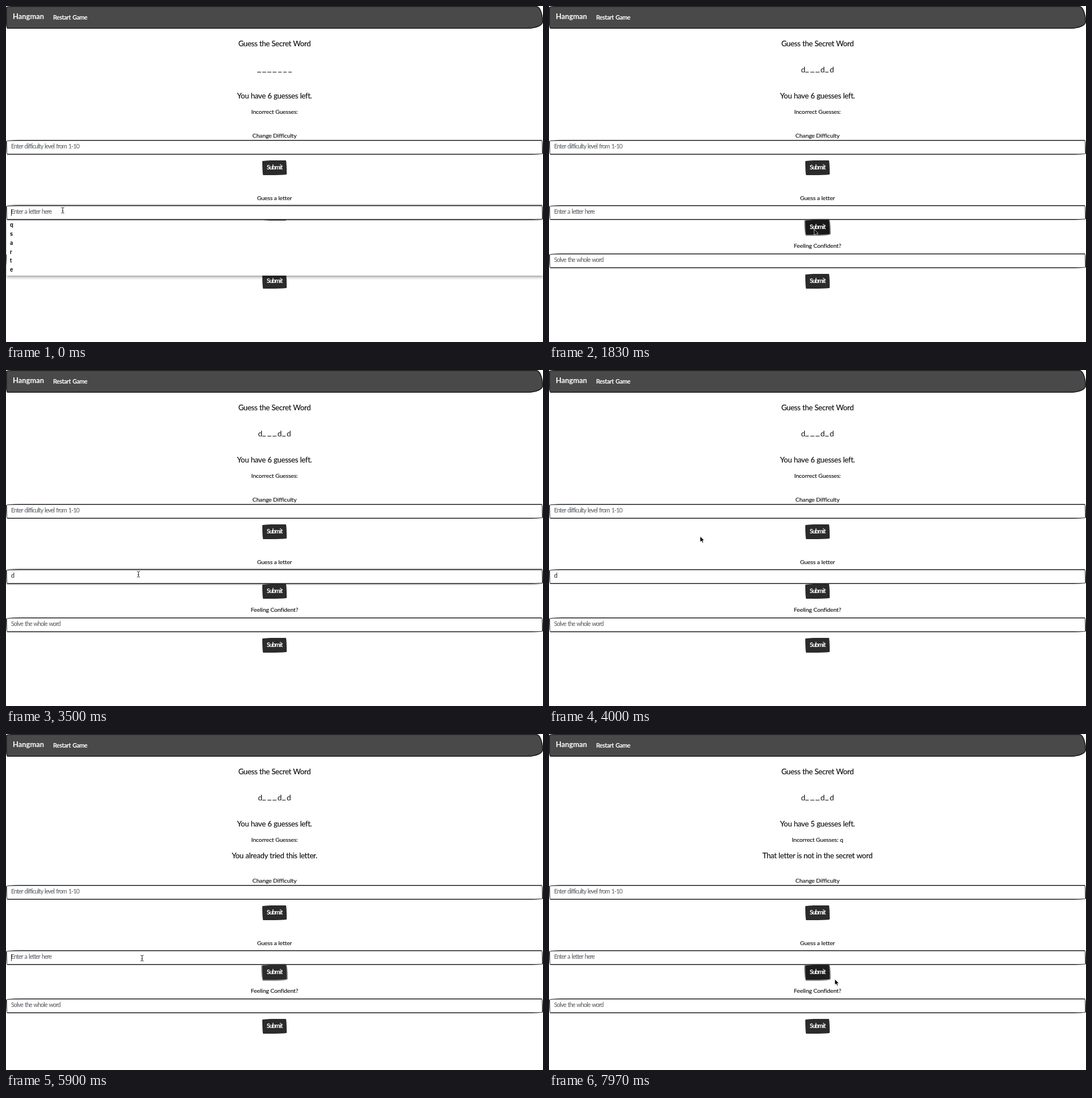
An HTML page that plays this animation: 947x592 px, repeating every 8 s.

```html
<!DOCTYPE html>
<html lang="en">
<head>
<meta charset="utf-8">
<title>Hangman</title>
<style>
  html, body { margin: 0; width: 100%; height: 100%; overflow: hidden; background: #fff; }
  #stage { position: absolute; left: 0; top: 0; width: 947px; height: 592px; overflow: hidden; font-family: Lato, sans-serif; color: #111; }
  #stage div, #stage p, #stage i, #stage svg { position: absolute; margin: 0; box-sizing: border-box; }

  /* Zero line height plus the shift makes "top" the text baseline. */
  p { line-height: 0; white-space: pre; transform: translateY(-.387em); }
  .big, .small { left: 0; width: 947px; text-align: center; -webkit-text-stroke: .15px; }
  .big { font-size: 13.2px; letter-spacing: -.3px; word-spacing: .3px; }
  .small { font-size: 10.4px; letter-spacing: -.1px; }

  /* Inset shadows draw outlines of fractional width. */
  nav { position: absolute; left: 0; top: 0; width: 947px; height: 40px;
    background: #494949; box-shadow: inset 0 0 0 1.5px #1c1c1c;
    border-radius: 18px 18px 41px 4px / 4px 41px 18px 18px; }
  .brand, .link { color: #fff; font-weight: 700; }
  .brand { left: 12px; top: 23px; font-size: 12.9px; }
  .link { left: 83px; top: 24px; font-size: 10.8px; letter-spacing: -.5px; word-spacing: 1px; }

  #form { left: 0; top: 0; width: 947px; height: 592px; }
  .field { left: 0; width: 947px; height: 26px; background: #fff;
    border-radius: 255px 25px 225px 25px / 25px 225px 25px 255px;
    box-shadow: inset 0 0 0 1.6px #1c1c1c, 0 0 1px 2px rgba(85,85,85,var(--glow, 0)); }
  .field p { left: 9px; top: 15px; font-size: 10.6px; letter-spacing: -.85px; word-spacing: 1.2px;
    color: #666b70; -webkit-text-stroke: .15px; }
  .button { left: 452px; width: 43px; height: 26px; background: #2b2b2b;
    border-radius: 24px 1.5px 21px 1.5px / 1.5px 21px 1.5px 24px; }
  .button p { left: 0; width: 100%; top: 16px; text-align: center; color: #fff;
    font-size: 10.8px; font-weight: 700; letter-spacing: -1.05px; }

  #caret { left: 9px; top: 358px; width: 1px; height: 11.5px; background: #333; }
  #menu { left: 1px; top: 378px; width: 946px; height: 97px; background: #fff; box-shadow: 0 2px 6px rgba(0,0,0,.45); }
  #menu p { left: 6px; font: 700 9.2px/0 Inter, sans-serif; }
  .blank { top: 116px; width: 6.3px; height: 1px; background: #111; }
  .found { top: 117px; font-size: 13.6px; }
</style>
</head>
<body>
<div id="stage">
  <nav></nav>
  <p class="brand">Hangman</p>
  <p class="link">Restart Game</p>
  <p class="big" style="top:70.5px">Guess the Secret Word</p>
  <div id="hiddenWord"></div>
  <div id="partWord"></div>
  <p class="big" style="top:162.5px" id="left"></p>
  <p class="small" style="top:189.5px" id="wrong"></p>
  <p class="big" style="top:219px" id="message"></p>

  <div id="form">
    <p class="small" style="top:231.7px">Change Difficulty</p>
    <div class="field" style="top:236px"><p>Enter difficulty level from 1-10</p></div>
    <div class="button" style="top:272px"><p>Submit</p></div>
    <p class="small" style="top:342.3px">Guess a letter</p>
    <div class="field" style="top:351px" id="field"><p id="letter"></p></div>
    <div class="button" style="top:377px" id="guess"><p>Submit</p></div>
    <p class="small" style="top:426.4px">Feeling Confident?</p>
    <div class="field" style="top:436px"><p>Solve the whole word</p></div>
    <div class="button" style="top:472px"><p>Submit</p></div>
    <i id="caret"></i>
    <div id="menu"></div>
  </div>

  <svg id="cursor" width="1" height="1" overflow="visible" style="left:0;top:0">
    <path id="arrow" d="M0 0V10.2L2.4 8 4.1 11.6 5.8 10.8 4.2 7.4H7.4Z" fill="#000" stroke="#fff" stroke-width=".7"/>
    <path id="beam" d="M-2.6-5Q0-5 0-3.6Q0-5 2.6-5M0-3.6V3.6M-2.6 5Q0 5 0 3.6Q0 5 2.6 5M-1.3 1H1.3" fill="none" stroke="#222" stroke-width="1"/>
  </svg>
</div>

<script>
const LOOP = 8000, FADE = 150, SHIFT = 30;
const el = id => document.getElementById(id);

// Time spans in ms
const focusSpans = [[-FADE, 470], [2970, 3820], [5900, 6450]];
const ringSpans = [[1100, 2970], [4750, 5900], [7200, LOOP + FADE]];
const hoverSpans = [[930, 1900], [4560, 4760], [7020, 7930]];
const menuSpans = [[0, 250], [3060, 3450], [6000, 6200]];
const typedSpans = [[250, 1130, "d"], [3450, 4760, "d"], [6200, 7230, "q"]];
const FIRST_HIT = 1130, REPEATED = 4760, MISSED = 7230;

// Pointer stops: time, x, y
const pointer = [
  [0, 100, 360], [180, 100, 360], [430, 245, 312], [490, 245, 312], [770, 421.5, 393],
  [980, 471, 394], [1780, 471, 394], [2450, 262, 365], [2900, 233, 361], [3480, 233, 361],
  [3760, 266.5, 293], [4130, 266.5, 293], [4620, 470, 396], [4830, 470, 396], [5030, 422, 396],
  [5720, 240, 395], [6220, 240, 395], [6400, 252.5, 329.5], [6620, 252.5, 329.5],
  [7080, 473, 424], [7860, 473, 424], [7965, 504, 432], [LOOP, 504, 432]
];

const clamp = v => Math.max(0, Math.min(1, v));
const spanAt = (spans, t) => spans.find(([a, b]) => t >= a && t < b);
const fadeAt = (spans, t) => Math.max(...spans.map(([a, b]) =>
  Math.min(clamp((t - a) / FADE), 1 - clamp((t - b) / FADE))));
const show = (node, on) => { node.style.visibility = on ? "visible" : "hidden"; };
const setText = (id, text) => { if (el(id).textContent !== text) el(id).textContent = text; };

function pointerAt(t) {
  const i = Math.max(1, pointer.findIndex(stop => stop[0] > t));
  const [t0, x0, y0] = pointer[i - 1], [t1, x1, y1] = pointer[i];
  const k = clamp((t - t0) / (t1 - t0)), e = k * k * (3 - 2 * k);
  return [x0 + (x1 - x0) * e, y0 + (y1 - y0) * e];
}

function buildWord(id, word, start) {
  let x = start;
  el(id).innerHTML = [...word].map((c, i) => {
    const left = x;
    x += c === "d" ? 7.2 : 9.05;
    return c === "_" ? `<i class="blank" style="left:${left}px"></i>`
                     : `<p class="found" style="left:${left - .5}px">${c}</p>`;
  }).join("");
}

function render(t) {
  const moved = t >= REPEATED, missed = t >= MISSED, hit = t >= FIRST_HIT;
  const shift = moved ? SHIFT : 0;

  show(el("hiddenWord"), !hit);
  show(el("partWord"), hit);
  setText("left", `You have ${missed ? 5 : 6} guesses left.`);
  setText("wrong", "Incorrect Guesses:" + (missed ? " q" : ""));
  setText("message", missed ? "That letter is not in the secret word" : moved ? "You already tried this letter." : "");
  el("form").style.transform = `translateY(${shift}px)`;

  const typed = spanAt(typedSpans, t), focus = spanAt(focusSpans, t);
  setText("letter", typed ? typed[2] : "Enter a letter here");
  el("letter").style.color = typed ? "#333" : "";
  el("field").style.setProperty("--glow", .28 * fadeAt(focusSpans, t));
  el("caret").style.left = (typed ? 15 : 9) + "px";
  show(el("caret"), focus && (t - Math.max(0, focus[0])) % 1000 < 500);
  show(el("menu"), spanAt(menuSpans, t));

  const shade = 43 - 18 * fadeAt(hoverSpans, t);
  el("guess").style.background = `rgb(${shade},${shade},${shade})`;
  el("guess").style.boxShadow = `0 0 0 2px rgba(70,70,70,${.6 * fadeAt(ringSpans, t)})`;

  const [x, y] = pointerAt(t);
  const overField = [236, 351, 436].some(top => y > top + shift && y < top + shift + 26);
  el("cursor").style.transform = `translate(${x}px,${y}px)`;
  show(el("beam"), overField);
  show(el("arrow"), !overField);
}

buildWord("hiddenWord", "_______", 443.3);
buildWord("partWord", "d___d_d", 445);
el("menu").innerHTML = [..."qsarte"].map((c, i) => `<p style="top:${12.3 + 15.75 * i}px">${c}</p>`).join("");

const began = performance.now();
function tick() {
  render((performance.now() - began) % LOOP);
  requestAnimationFrame(tick);
}
tick();
</script>
</body>
</html>
```
